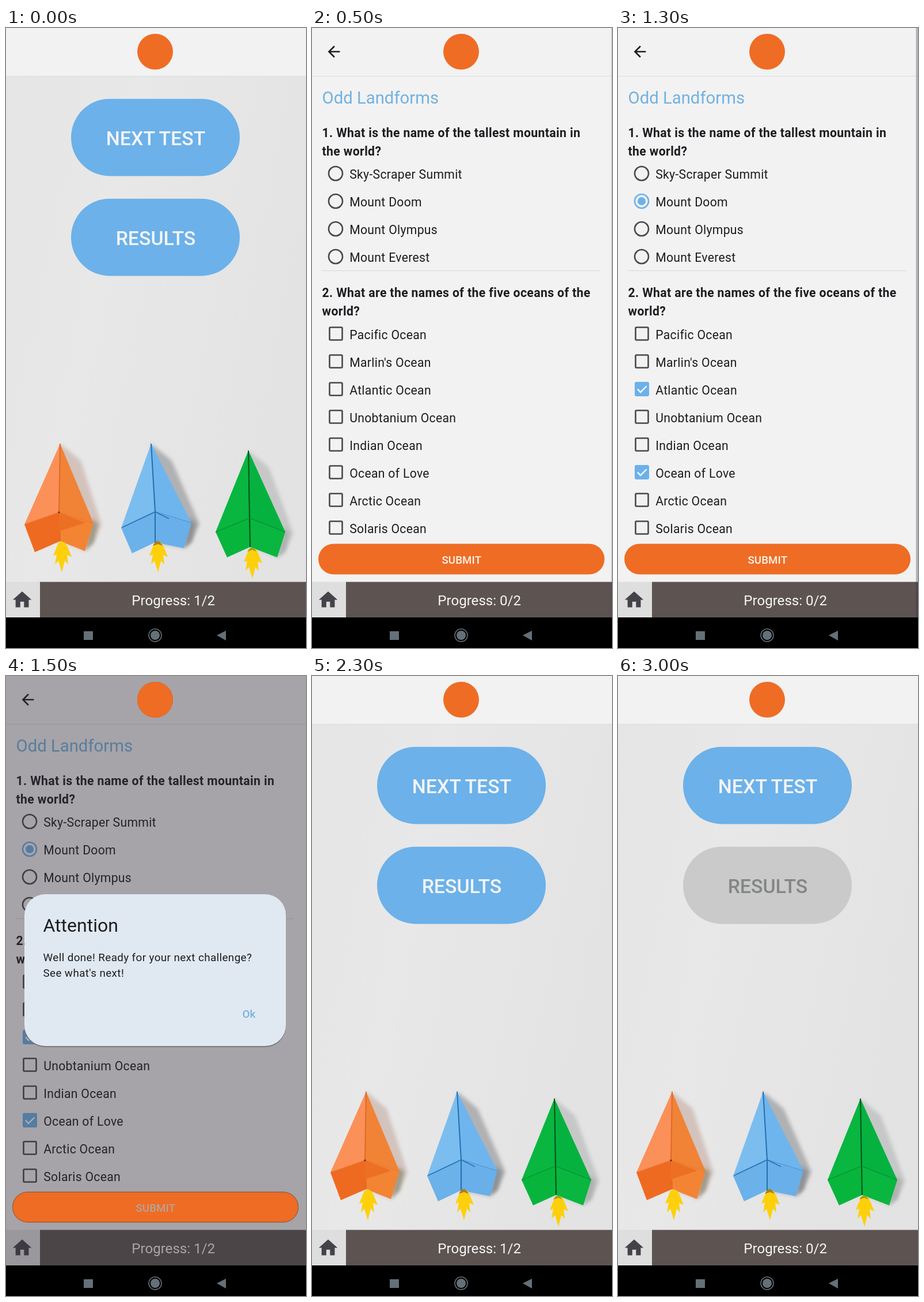
Animation of 521 by 1074 pixels, one loop 3500 ms. Source, as an HTML page:

```html
<!DOCTYPE html>
<html lang="en">
<head>
<meta charset="utf-8">
<title>Quiz app walkthrough</title>
<style>
  html, body { margin: 0; width: 100%; height: 100%; overflow: hidden; background: #000; }
  svg { display: block; width: 521px; height: 1074px; font-family: Roboto, sans-serif; }
</style>
</head>
<body>
<svg id="stage" viewBox="0 0 521 1074"></svg>
<script>
const BLUE = '#6cb1e9', ORANGE = '#ef6c24', INK = '#1d1c20', PAGE = '#f2f2f2';
const STEP = 500;

const rect = (x, y, w, h, fill, rx = 0, extra = '') =>
  `<rect x="${x}" y="${y}" width="${w}" height="${h}" rx="${rx}" fill="${fill}" ${extra}/>`;
const circle = (x, y, r, fill, extra = '') =>
  `<circle cx="${x}" cy="${y}" r="${r}" fill="${fill}" ${extra}/>`;
const poly = (points, fill, extra = '') => `<polygon points="${points}" fill="${fill}" ${extra}/>`;
const path = (d, stroke, width = 1) =>
  `<path d="${d}" fill="none" stroke="${stroke}" stroke-width="${width}"/>`;
const text = (x, y, size, str, { fill = INK, weight = 400, anchor = 'start', spacing = 0 } = {}) =>
  `<text x="${x}" y="${y}" font-size="${size}" fill="${fill}" font-weight="${weight}"
    text-anchor="${anchor}" letter-spacing="${spacing}">${str}</text>`;

const blur = (id, amount) =>
  `<filter id="${id}" x="-30%" y="-30%" width="160%" height="160%"><feGaussianBlur stdDeviation="${amount}"/></filter>`;
const defs = `<defs>
  <linearGradient id="wall" x2="1" y2=".35">
    <stop stop-color="#e5e5e5"/><stop offset=".4" stop-color="#e8e8e8"/><stop offset="1" stop-color="#e3e3e3"/>
  </linearGradient>${blur('soft', 3)}${blur('photo', .6)}
</defs>`;

const logo = circle(259, 41, 31, ORANGE);
const backArrow = `<path transform="translate(22.4 25.4) scale(1.3)" fill="${INK}"
  d="M20 11H7.83l5.59-5.59L12 4l-8 8 8 8 1.41-1.41L7.83 13H20z"/>`;

const header = back =>
  rect(0, 0, 521, 83, PAGE) + rect(0, 83, 521, 1, '#dcdcdc') + (back ? backArrow : '') + logo;

const footer = done =>
  rect(0, 959.5, 59, 61.5, '#dedede') + rect(59, 959.5, 462, 61.5, '#5d5452') +
  `<path transform="translate(8.5 971) scale(1.63)" fill="#45434a"
    d="M10 20v-6h4v6h5v-8h3L12 3 2 12h3v8z"/>` +
  text(290.7, 1000, 24.1, `Progress: ${done}/2`, { fill: '#f5f5f5', anchor: 'middle' });

const navBar = rect(0, 1021, 521, 53, '#000') + rect(135, 1045, 16, 15, '#647078') +
  circle(259, 1052, 11, 'none', 'stroke="#647078" stroke-width="1.6"') + circle(259, 1052, 8, '#647078') +
  poly('366,1052 382,1044 382,1061', '#647078');

const pill = (y, label, enabled) =>
  rect(113, y, 293, 133.7, enabled ? BLUE : '#cacaca', 66.8) +
  text(260, y + 80.3, 33.9, label, { fill: enabled ? '#f3f5f7' : '#838587', weight: 500, anchor: 'middle' });

const flame = (x, y) => `<g transform="translate(${x} ${y})">` +
  poly('-6,1 -9,8 -15,23 -9,21 -12,38 -6,32 0,52 5,32 11,38 9,22 17,25 10,8 6,1 0,-2', '#fdd00b') + '</g>';

const shift = ([x, y], dx, dy) => [x + dx, y + dy];

// Corners: nose, left wing, left tail, notch, right tail, right wing, and the inner fold.
function plane({ nose, left, leftTail, notch, rightTail, right, fold, colors, line, crease, shade, core, flameAt }) {
  const [leftTop, rightTop, leftLow, rightLow] = colors;
  const outer = shift(right, 14, 2), lower = shift(right, 0, 33);
  const shadow = poly([nose, shift(nose, 27, 22), shift(nose, 36, 30), outer, lower, rightTail, notch],
      shade, 'filter="url(#soft)"') +
    poly([shift(right, -3, -8), shift(right, 8, 1), lower, rightTail], core, 'filter="url(#soft)"');
  return shadow + '<g filter="url(#photo)">' +
    poly([nose, left, fold], leftTop) + poly([nose, right, fold], rightTop) +
    poly([left, fold, notch, leftTail], leftLow) + poly([right, fold, notch, rightTail], rightLow) +
    path(`M${nose}L${fold}L${notch}`, line, 2) + path(`M${left}L${fold}L${right}`, crease, 1.2) +
    '</g>' + flame(...flameAt);
}

const planes = plane({
  nose: [94, 720], left: [32, 860], leftTail: [50, 908], notch: [94, 889], rightTail: [137, 906],
  right: [152, 858], fold: [92, 839], colors: ['#fc9059', '#f08336', '#ee6a21', '#f38434'],
  line: '#dd6a28', crease: '#ee7530', shade: '#d3c3bd', core: '#9d9a88', flameAt: [97, 891]
}) + poly('92,839 138,857 92,872', '#ec7024') + circle(92, 839, 1.5, '#4a2510') + plane({
  nose: [252, 720], left: [200, 866], leftTail: [219, 910], notch: [259, 891], rightTail: [309, 901],
  right: [322, 857], fold: [259, 838], colors: ['#7cbdf0', '#6fb5ed', '#6bb1ea', '#69afe9'],
  line: '#2170ae', crease: '#4c97d4', shade: '#b0b1b3', core: '#8e9093', flameAt: [264, 891]
}) + path('M202 865L259 838L283 850', '#2877b6', 1.8) +
  `<path d="M255 897q8-17 17 0l-8-3z" fill="#b17d1f"/>` + plane({
  nose: [421, 732], left: [364, 873], leftTail: [384, 917], notch: [424, 899], rightTail: [471, 917],
  right: [485, 873], fold: [423, 849], colors: ['#08b640', '#05b240', '#07b53c', '#09b63f'],
  line: '#054f1a', crease: '#058a2d', shade: '#c6c8c7', core: '#aeb1b0', flameAt: [428, 902]
}) + `<path d="M419 907q8-14 16 0l-7-3z" fill="#a59a1c"/>`;

const home = (done, hasResults) =>
  rect(0, 83, 521, 877, 'url(#wall)') + header(false) +
  pill(122.7, 'NEXT TEST', true) + pill(295.7, 'RESULTS', hasResults) + planes + footer(done) + navBar;

const label = (y, str) => text(65.2, y + 9, 21.2, str, { spacing: .3 });
const question = (y, lines) => lines.map((line, i) =>
  text(17.5, y + 32 * i, 21.2, line, { weight: 700, spacing: .37 })).join('');

const radio = (y, str, on) =>
  circle(41, y, 12, 'none', `stroke="${on ? BLUE : '#48474b'}" stroke-width="2.6"`) +
  (on ? circle(41, y, 7, BLUE) : '') + label(y, str);

const checkbox = (y, str, on) => (on
  ? rect(29, y - 12.5, 25, 25, BLUE, 3) + path(`M34 ${y}l5 5.5l10.5-10.5`, '#fff', 2.4)
  : rect(30.5, y - 11, 22, 22, 'none', 1.5, 'stroke="#48474b" stroke-width="2.6"')) + label(y, str);

const mountains = ['Sky-Scraper Summit', 'Mount Doom', 'Mount Olympus', 'Mount Everest'];
const oceans = ['Pacific Ocean', "Marlin's Ocean", 'Atlantic Ocean', 'Unobtanium Ocean',
  'Indian Ocean', 'Ocean of Love', 'Arctic Ocean', 'Solaris Ocean'];

const submit = (fill = '#fbf3ee') =>
  rect(11, 893.5, 497, 53, ORANGE, 26.5) +
  text(259.8, 927.5, 18.7, 'SUBMIT', { fill, weight: 500, anchor: 'middle', spacing: .13 });

const quiz = (answered, done) =>
  rect(0, 83, 521, 877, PAGE) + header(true) +
  text(17.5, 131, 29.3, 'Odd Landforms', { fill: '#71b2e2' }) +
  question(189, ['1. What is the name of the tallest mountain in', 'the world?']) +
  mountains.map((name, i) => radio(252 + 48 * i, name, answered && i === 1)).join('') +
  rect(17, 420, 484, 1, '#d6d6d6') +
  question(466, ['2. What are the names of the five oceans of the', 'world?']) +
  oceans.map((name, i) => checkbox(529.5 + 48 * i, name, answered && (i === 2 || i === 5))).join('') +
  submit() + footer(done) + navBar;

const edge = (x, opacity) => rect(x, 0, 521 - x, 1021, '#282c48', 0, `opacity="${opacity}"`);

const dialog = () =>
  rect(0, 0, 521, 1021, '#322f37', 0, 'opacity=".4"') + logo +
  submit('#b5a49a') + rect(11.5, 894, 496, 52, 'none', 26, 'stroke="#79604f" stroke-width="1"') +
  rect(32, 380, 454, 263, '#77797d', 36) + rect(32, 378, 454, 263, '#e0e9f2', 36) +
  text(64.5, 443, 32, 'Attention') +
  text(64.5, 494, 18.8, 'Well done! Ready for your next challenge?', { spacing: .41 }) +
  text(64.5, 521, 18.8, "See what's next!", { spacing: .41 }) +
  text(410.5, 591.5, 18.8, 'Ok', { fill: '#79b3e0', weight: 500 });

const results = () =>
  rect(0, 83, 521, 877, '#f1f1f1') + header(true) +
  rect(11.5, 97, 496, 95, '#dadfe9', 15, 'stroke="#e4e7ec" stroke-width="1.5"') +
  text(32.5, 148, 21.2, 'Test Odd Landforms') + text(465.5, 152, 18.7, '0 %') + footer(1) + navBar;

const scenes = [
  home(1, true),
  quiz(false, 0) + edge(519.5, .2),
  quiz(true, 0) + edge(517.5, .32),
  quiz(true, 1) + dialog(),
  home(1, true),
  results(),
  home(0, false)
];

const stage = document.getElementById('stage');
let shown = -1;
function draw() {
  const index = Math.floor(performance.now() / STEP) % scenes.length;
  if (index !== shown) {
    stage.innerHTML = defs + scenes[index];
    shown = index;
  }
  requestAnimationFrame(draw);
}
draw();
</script>
</body>
</html>
```
